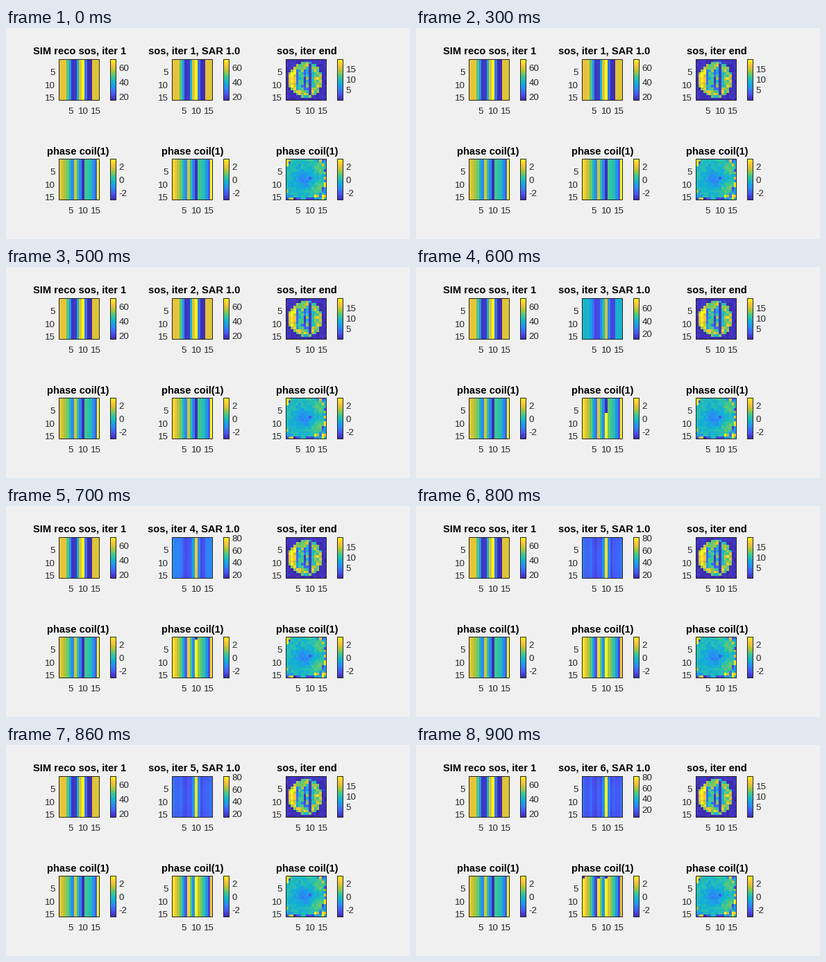
A matplotlib script that plays this animation: 582x305 px, repeating every 1 s.

```python
import numpy as np
import matplotlib.pyplot as plt
from matplotlib.animation import FuncAnimation
from matplotlib.colors import LinearSegmentedColormap
from matplotlib.patches import Rectangle

W, H, DPI = 582, 305, 96
N = 16
BOX_W, BOX_H, BAR_W = 59, 60, 9
LEFT, TOP = (76, 239, 403), (45, 189)
TITLE_X = ((105.7, 270.7, 433), (104, 269, 433.3))
TITLE_Y = (38, 183)
INK = "#262626"

plt.rcParams["font.family"] = "Liberation Sans"
parula = LinearSegmentedColormap.from_list("parula", [
    (0.2422, 0.1504, 0.6603), (0.2810, 0.3228, 0.9579),
    (0.1786, 0.5289, 0.9682), (0.0689, 0.6948, 0.8394),
    (0.2161, 0.7843, 0.5923), (0.6720, 0.7793, 0.2227),
    (0.9970, 0.7659, 0.2199), (0.9769, 0.9839, 0.0805)])

fig = plt.figure(figsize=(W / DPI, H / DPI), dpi=DPI, facecolor="#f0f0f0")
ax = fig.add_axes([0, 0, 1, 1])
ax.axis("off")


def number(x, y, text, ha):
    """Tick label whose digits are centred on y."""
    return ax.text(x, y + 4.7, text, ha=ha, va="baseline", size=10, color=INK)


def picture(x, y, w, h, data):
    """Colour-mapped cells with a one-pixel frame inside their edge."""
    im = ax.imshow(data, cmap=parula, vmin=0, vmax=1, aspect="auto",
                   extent=(x, x + w, y + h, y), interpolation="nearest")
    ax.add_patch(Rectangle((x + 0.5, y + 0.5), w - 1, h - 1, fill=False,
                           ec=INK, lw=0.75, snap=False, zorder=3))
    return im


def bar_y(v, top, lo, hi):
    return top + 1 + 59 * (hi - v) / (hi - lo)


def panel(c, r, title, data, clim, ticks):
    x, y = LEFT[c], TOP[r]
    head = ax.text(TITLE_X[r][c], TITLE_Y[r], title, ha="center",
                   va="baseline", size=11, weight="bold", color="black")
    im = picture(x, y, BOX_W, BOX_H, data)
    for n in (5, 10, 15):
        number(x + 0.5 + (n - 0.5) * 58 / N, y + 74.7, str(n), "center")
        number(x - 5.5, y + 1.8 + (n - 0.5) * 59 / N, str(n), "right")
    picture(x + 74, y, BAR_W, BOX_H, np.linspace(1, 0, 128)[:, None])
    marks = [number(x + 86.6, bar_y(v, y, *clim), str(v), "left") for v in ticks]
    return head, im, marks


rng = np.random.default_rng(4)
row, col = np.mgrid[0:N, 0:N]


def blob(cx, cy, sx, sy):
    return np.exp(-((col - cx) / sx) ** 2 - ((row - cy) / sy) ** 2)


def disc():
    """Magnitude of the phantom: bright rim, dark vertical bands."""
    r = np.hypot(col - 7.1, row - 7.5)
    v = 0.52 + 0.2 * np.exp(-((r - 5.4) / 1.1) ** 2) + 0.25 * blob(2, 7.5, 1.5, 5)
    v += rng.normal(0, 0.1, (N, N))
    v -= 0.35 * (np.isin(col, (4, 7)) & (abs(row - 7.5) < 4))
    v[(col == 9) & (abs(row - 7.5) < 6)] = 0.06
    return np.where(r < 6.8, np.clip(v, 0.05, 1), 0.07 * rng.random((N, N)))


def disc_phase():
    """Smooth phase inside, wrapped noise around it."""
    v = 0.49 - 0.2 * blob(6.5, 7.5, 3.5, 3.5) + rng.normal(0, 0.035, (N, N))
    v += 0.15 * blob(12, 11, 2, 2.5) + 0.12 * blob(12, 3, 2, 2)
    v[7, 9] = 0.15
    far = np.hypot(col - 6.7, row - 6.9) > 8.2
    return np.where(far, rng.random((N, N)), v)


def magnitude(k):
    """Stripes that fade to a floor while one column stays bright."""
    wave = np.interp(col, (2, 3, 5, 6, 8, 9, 10, 11, 12, 13),
                     (0.82, 0.6, 0.05, 0.06, 0.8, 1, 0.22, 0.02, 0.02, 0.8))
    fade = 0.45 ** max(0, k - 1)
    v = 0.16 + (wave - 0.16) * fade
    v += (0.98 - v) * np.exp(-((col - 9) / 0.8) ** 2) * (1 - fade)
    ripple = 0.05 * np.cos(2.1 * col) - 0.04 * ((row - 7.5) / 7.5) ** 2
    return np.clip(v + ripple * (1 - fade) ** 4, 0, 1)


def phase(k, start=0.92):
    """Falling ramps that steepen; one column wraps from low to high."""
    t = max(0, k - 1)
    v = np.interp(col, (0, 3, 5, 6, 9, 10, 12, 14, 15),
                  (start + 0.015 * t, 0.64 - 0.01 * t, 0.3 - 0.05 * t,
                   0.78 + 0.04 * t, 0.03, 0.58 + 0.05 * t, 0.5 + 0.015 * t,
                   0.16 - 0.02 * t, 1 - 0.045 * t))
    unwrapped = (N, 6, 1, 0, 0)[t]
    v[unwrapped:, 9] = 0.99
    if t == 4:
        v[0, v[0] > 0.9] = 0.03
    return v


PI = (-np.pi, np.pi)
ANG = (2, 0, -2)
AMP = (80, 60, 40, 20)
WIDE = (14.5, 70.7)
CLIMS = (WIDE, WIDE, (10.3, 75.1), (13.6, 80.2), (13.6, 80.2), (5, 80.2))

panel(0, 0, "SIM reco sos, iter 1", magnitude(0), WIDE, AMP[1:])
head, mag_im, marks = panel(1, 0, "", magnitude(0), WIDE, AMP)
panel(2, 0, "sos, iter end", disc(), (-0.3, 19.4), (15, 10, 5))
panel(0, 1, "phase coil(1)", phase(0, 0.83), PI, ANG)
_, phase_im, _ = panel(1, 1, "phase coil(1)", phase(0), PI, ANG)
panel(2, 1, "phase coil(1)", disc_phase(), PI, ANG)

ax.set_xlim(0, W)
ax.set_ylim(H, 0)


def update(i):
    k = max(0, i - 4)
    mag_im.set_data(magnitude(k))
    phase_im.set_data(phase(k))
    head.set_text(f"sos, iter {k + 1}, SAR 1.0")
    for v, mark in zip(AMP, marks):
        mark.set_y(bar_y(v, TOP[0], *CLIMS[k]) + 4.7)
        mark.set_visible(v <= CLIMS[k][1])
    return mag_im, phase_im, head, *marks


anim = FuncAnimation(fig, update, frames=10, interval=100, repeat=True,
                     repeat_delay=0, blit=False)
plt.show()
```
